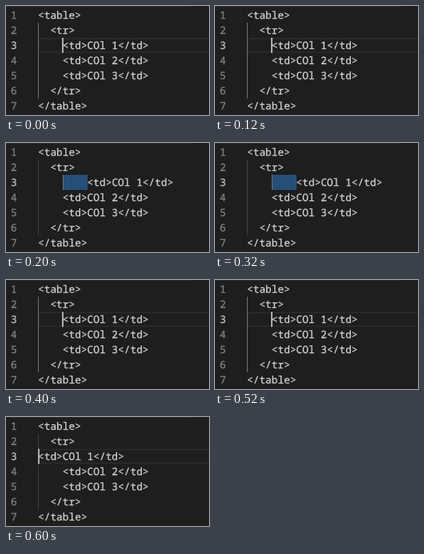
Write an HTML page with a canvas that moves like this. It is 254x137 px and loops after 0.8 s.

```html
<!DOCTYPE html>
<html lang="en">
<head>
<meta charset="utf-8">
<title>Indenting a table cell</title>
<style>
  html, body { margin: 0; width: 100%; height: 100%; overflow: hidden; background: #1e1e1e; }
  canvas { display: block; }
</style>
</head>
<body>
<canvas id="stage"></canvas>
<script>
const W = 254, H = 137;
const LEFT = 40, TOP = 2, ROW = 19, CHAR = 7.7, BASE = 14;
const ACTIVE = 2;
const STEP = 200;

const lines = [
  [0, '<table>'],
  [2, '<tr>'],
  [4, '<td>COl 1</td>'],
  [4, '<td>COl 2</td>'],
  [4, '<td>COl 3</td>'],
  [2, '</tr>'],
  [0, '</table>']
];

// Indent of the edited line at each step of the loop
const indents = [4, 8, 4, 0];

const canvas = document.getElementById('stage');
const ctx = canvas.getContext('2d', { alpha: false });
const ratio = window.devicePixelRatio || 1;
canvas.width = W * ratio;
canvas.height = H * ratio;
canvas.style.width = W + 'px';
canvas.style.height = H + 'px';
ctx.scale(ratio, ratio);
ctx.font = '12.83px "Noto Sans Mono", "DejaVu Sans Mono", monospace';
ctx.textRendering = 'geometricPrecision';
ctx.lineJoin = 'round';

const colX = col => LEFT + col * CHAR;
const rowY = row => TOP + row * ROW;

function rect(x, y, w, h, color) {
  ctx.fillStyle = color;
  ctx.fillRect(Math.round(x), y, w, h);
}

// A hairline outline gives the text its slightly heavier weight
function text(str, x, row, color) {
  const y = rowY(row) + BASE;
  ctx.fillStyle = ctx.strokeStyle = color;
  ctx.lineWidth = 0.25;
  ctx.fillText(str, x, y);
  ctx.strokeText(str, x, y);
}

function highlight(row) {
  ctx.strokeStyle = '#282828';
  ctx.lineWidth = 2;
  ctx.strokeRect(LEFT + 1, rowY(row) + 1, W, ROW - 2);
}

function draw(step) {
  const edited = indents[step];
  const selected = edited > 4;

  rect(0, 0, W, H, '#1e1e1e');
  rect(0, 0, 232, 1, '#2d2d2d');
  if (selected) rect(colX(4), rowY(ACTIVE), 31, ROW, '#264f78');
  else highlight(ACTIVE);

  lines.forEach(([indent, str], row) => {
    const col = row === ACTIVE ? edited : indent;
    if (col > 0) rect(LEFT, rowY(row), 1, ROW, edited === 4 ? '#707070' : '#404040');
    if (col > 4) rect(colX(4), rowY(row), 1, ROW, '#707070');
    text(String(row + 1), 6, row, row === ACTIVE ? '#c6c6c6' : '#858585');
    text(str, colX(col), row, '#d4d4d4');
  });

  // The caret straddles the gap between two characters
  if (!selected) rect(Math.max(LEFT, colX(edited) - 1), rowY(ACTIVE), 2, ROW, '#aeafad');
}

let start = null;
function tick(now) {
  if (start === null) start = now;
  draw(Math.floor(Math.max(0, now - start) / STEP) % indents.length);
  requestAnimationFrame(tick);
}
draw(0);
requestAnimationFrame(tick);
</script>
</body>
</html>
```
